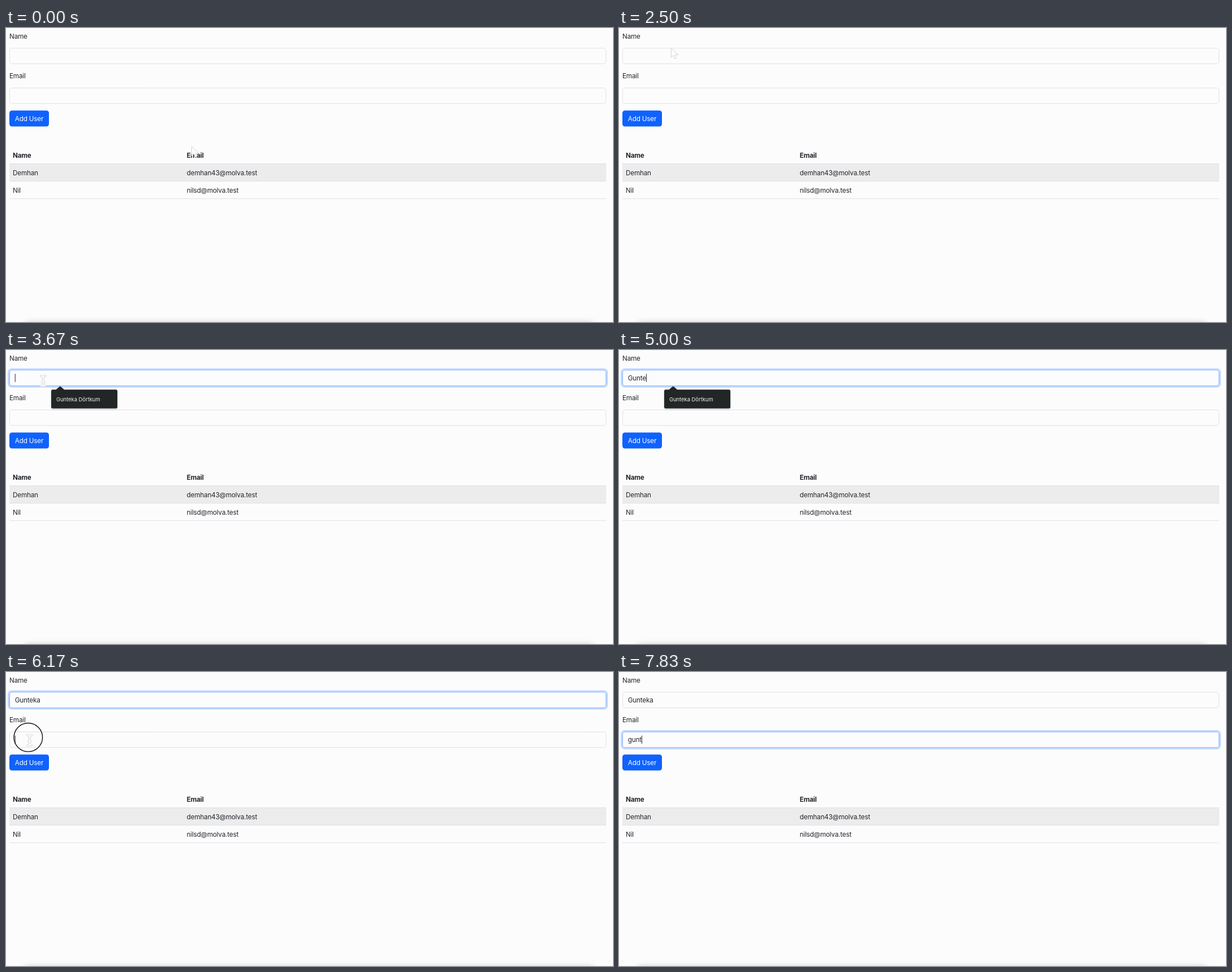
Animation of 1074 by 521 pixels, one loop 8 s. Source, as an HTML page:

```html
<!DOCTYPE html>
<html lang="en">
<head>
<meta charset="utf-8">
<title>Add user form</title>
<style>
  html, body { margin: 0; width: 100%; height: 100%; overflow: hidden; background: #fdfcfd; }
  svg { display: block; width: 1074px; height: 521px; }
  text { font: 11.7px Inter, "Noto Sans", sans-serif; letter-spacing: -.17px; fill: #212529; }
  .head { font-weight: 700; }
  .field { fill: #fdfcfd; stroke: #dee2e6; }
  .ring { fill: none; stroke: #c1d8fe; stroke-width: 3; visibility: hidden; }
  .focus .field { stroke: #86b7fe; }
  .focus .ring { visibility: visible; }
  .line { stroke: #dee2e6; }
  .tip text { font-size: 9.4px; letter-spacing: 0; fill: #f1f2f2; }
  .arrow { fill: #fff; stroke: #d3d3d5; stroke-linejoin: round; }
  .beam { fill: none; stroke-linecap: round; }
</style>
</head>
<body>
<svg viewBox="0 0 1074 521">
  <defs>
    <filter id="soft" x="-5%" y="-100%" width="110%" height="300%"><feGaussianBlur stdDeviation="6"/></filter>
    <filter id="drop" x="-10%" y="-20%" width="120%" height="150%"><feDropShadow dx="0" dy="1" stdDeviation="1.5" flood-opacity=".25"/></filter>
    <path id="ibeam" d="M-4-9Q0-9 0-5V5Q0 9-4 9M4-9Q0-9 0-5M0 5Q0 9 4 9M-2 2H2"/>
  </defs>
  <rect width="1074" height="521" fill="#fdfcfd"/>
  <rect x="34" y="523" width="1004" height="30" filter="url(#soft)" opacity=".25"/>

  <text x="6" y="18.8">Name</text>
  <text x="6" y="89.3">Email</text>
  <g id="name">
    <rect class="ring" x="4.5" y="34" width="1059" height="31" rx="5.5"/>
    <rect class="field" x="6.5" y="35.8" width="1055" height="27.6" rx="4.5"/>
    <text x="15.8" y="53.9"></text>
  </g>
  <g id="email">
    <rect class="ring" x="4.5" y="104.5" width="1059" height="31" rx="5.5"/>
    <rect class="field" x="6.5" y="106.2" width="1055" height="27.6" rx="4.5"/>
    <text x="15.8" y="124.3"></text>
  </g>
  <rect id="caret" width="1" height="14.5" fill="#212529"/>

  <rect x="6" y="146.3" width="70" height="28.3" rx="4.5" fill="#0f62fe"/>
  <text x="15.8" y="164.9" style="fill:#fff">Add User</text>

  <rect x="6" y="241" width="1056" height="31" fill="#ececed"/>
  <path class="line" d="M6 240.5H1062M6 271.5H1062M6 302.5H1062"/>
  <text class="head" x="12" y="230.2">Name</text>
  <text class="head" x="319.8" y="230.2">Email</text>
  <text x="12" y="261">Demhan</text>
  <text x="319.8" y="261">demhan43@molva.test</text>
  <text x="12" y="291.7">Nil</text>
  <text x="319.8" y="291.7">nilsd@molva.test</text>

  <g id="tip" class="tip">
    <path filter="url(#drop)" fill="#212527" d="M82.5 70.3H88.5L94.5 65Q95.7 64 97 65L103 70.3H194.5Q197 70.3 197 72.8V101Q197 103.5 194.5 103.5H82.5Q80 103.5 80 101V72.8Q80 70.3 82.5 70.3Z"/>
    <text x="89" y="90.6">Gunteka Dörtkum</text>
  </g>

  <path id="arrow" class="arrow" d="M0 0V16.5L3.8 13L6.3 19L9.3 17.8L6.8 12H12.3Z"/>
  <g id="beam" class="beam">
    <use href="#ibeam" stroke="#cbcbcd" stroke-width="3.6"/>
    <use href="#ibeam" stroke="#fff" stroke-width="1.9"/>
  </g>
  <circle id="click" r="25.3" fill="none" stroke="#111" stroke-width="1.4"/>
</svg>
<script>
const LOOP = 8000;
const $ = id => document.getElementById(id);
const arrow = (x, y) => ({ arrow: [x, y], beam: null });
const beam = (x, y) => ({ arrow: null, beam: [x, y] });
const start = { arrow: null, beam: null, click: null, name: "", email: "", focus: "", caret: "", tip: false };

// Each step changes part of the state at its time.
const steps = [
  [0, arrow(328.5, 210)],
  [170, arrow(331, 212)],
  [2500, arrow(92.3, 35.5)],
  [2830, beam(80, 44)],
  [3000, beam(70, 51)],
  [3170, beam(65.7, 55)],
  [3330, { click: [64, 50] }],
  [3500, { click: null, focus: "name", caret: "name" }],
  [3670, { tip: true }],
  [4000, { caret: "" }],
  [4330, { name: "G", caret: "name", beam: null }],
  [4500, { name: "Gu" }],
  [4670, { name: "Gun" }],
  [4830, { name: "Gunt" }],
  [5000, { name: "Gunte" }],
  [5170, { name: "Guntek" }],
  [5330, { name: "Gunteka" }],
  [5500, beam(64, 58)],
  [5670, arrow(57, 78)],
  [5830, { ...beam(46, 110), caret: "" }],
  [6000, { ...beam(41.7, 121), tip: false }],
  [6170, { click: [39.3, 115.8], caret: "email" }],
  [6330, { click: null, focus: "email" }],
  [6670, { caret: "" }],
  [7170, { caret: "email" }],
  [7330, { email: "g", beam: null }],
  [7500, { email: "gu" }],
  [7670, { email: "gun" }],
  [7830, { email: "gunt" }]
];

const show = (el, on) => el.setAttribute("visibility", on ? "visible" : "hidden");

function place(id, at) {
  show($(id), at);
  if (at) $(id).setAttribute("transform", `translate(${at})`);
}

function draw(s) {
  for (const id of ["name", "email"]) {
    $(id).setAttribute("class", s.focus === id ? "focus" : "");
    $(id).querySelector("text").textContent = s[id];
  }
  for (const id of ["arrow", "beam", "click"]) place(id, s[id]);
  show($("tip"), s.tip);
  const width = s.caret && s[s.caret] ? $(s.caret).querySelector("text").getComputedTextLength() : 0;
  place("caret", s.caret ? [15.7 + width, s.caret === "name" ? 42.2 : 112.7] : null);
}

const begin = performance.now();
let last = -1;
function tick() {
  const t = (performance.now() - begin) % LOOP;
  const done = steps.filter(([at]) => at <= t);
  if (done.length !== last) {
    last = done.length;
    draw(Object.assign({}, start, ...done.map(([, change]) => change)));
  }
  requestAnimationFrame(tick);
}
tick();
</script>
</body>
</html>
```
